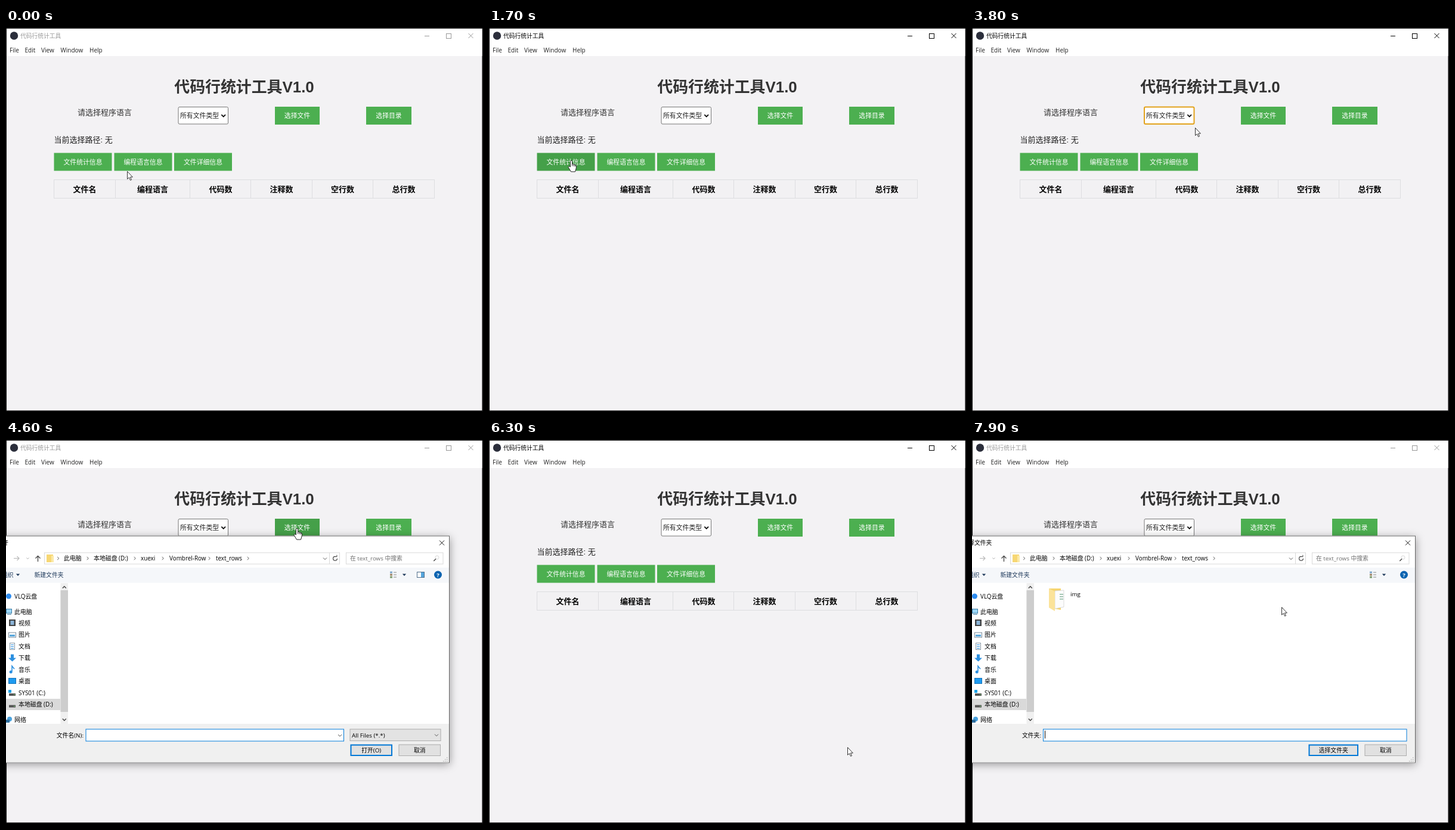
Animation of 800 by 644 pixels, one loop 8000 ms. Source, as an HTML page with a canvas:

```html
<!DOCTYPE html>
<html lang="zh-CN">
<head>
<meta charset="utf-8">
<style>
html, body { margin: 0; height: 100%; overflow: hidden; background: #000; }
canvas { display: block; }
</style>
</head>
<body>
<canvas id="stage" width="800" height="644"></canvas>
<script>
const c = document.getElementById('stage').getContext('2d');
const UI = '"Open Sans", "Noto Sans CJK SC", sans-serif';
const PAGE = '"Liberation Sans", "Noto Sans CJK SC", sans-serif';
const LOOP = 8000, STEP = 100;

// Pointer track: time, x, y
const track = [
  [0, 203, 240], [200, 225, 230], [400, 330, 226], [900, 675, 264], [1100, 675, 264],
  [1500, 146, 225], [1600, 146, 225], [1700, 138, 222], [2000, 290, 152], [2200, 346, 150],
  [2300, 346, 152], [2400, 342, 190], [2500, 350, 227], [2600, 356, 253], [2700, 356, 253],
  [2900, 358, 174], [3200, 358, 174], [3400, 371, 168], [3700, 371, 168], [3800, 374, 167],
  [4100, 488, 148], [4900, 488, 148], [5300, 419, 264], [5500, 419, 264], [5800, 597, 487],
  [5900, 605, 515], [6200, 605, 515], [6300, 601, 515], [6700, 640, 149], [7700, 640, 149],
  [7900, 519, 280]
];

const languages = ['所有文件类型', 'JavaScript', 'Python', 'Java', 'XML', 'HTML', 'Lua', 'C#',
  'PHP', 'CSS', 'Vue', 'TypeScript', 'Go', 'Rust'];
const buttons = [
  ['选择文件', 451, 132, 75], ['选择目录', 604, 132, 76],
  ['文件统计信息', 80.5, 209.5, 97], ['编程语言信息', 181.5, 209.5, 97], ['文件详细信息', 282, 209.5, 97]
];
const headers = [['文件名', 132], ['编程语言', 246], ['代码数', 360], ['注释数', 462], ['空行数', 564.5], ['总行数', 667]];
const crumbs = [['此电脑', 97, 137], ['本地磁盘 (D:)', 147, 216], ['xuexi', 226, 263],
  ['Vombrel-Row', 274, 341], ['text_rows', 352, 406]];
const files = [['blackList', '1.26 KB', 331, 253], ['commentPatterns', '1.66 KB', 537, 253],
  ['fileCounter', '5.14 KB', 125, 303], ['readDirectory', '23.8 KB', 331, 303], ['README', '4.92 KB', 537, 303]];
const places = [['VLQ云盘', 14, 262], ['此电脑', 14, 288], ['视频', 21, 307], ['图片', 21, 326.5],
  ['文档', 21, 346], ['下载', 21, 365.5], ['音乐', 21, 385], ['桌面', 21, 404],
  ['SYS01 (C:)', 21, 424], ['本地磁盘 (D:)', 21, 443.5], ['网络', 14, 469]];

function text(s, x, cy, size = 9.8, color = '#000', align = 'left', font = UI, weight = '') {
  c.font = `${weight} ${size}px ${font}`;
  c.fillStyle = color;
  c.textAlign = align;
  c.fillText(s, x, cy + size * 0.37);
}
function box(x, y, w, h, fill, stroke, width = 1) {
  if (fill) { c.fillStyle = fill; c.fillRect(x, y, w, h); }
  if (stroke) {
    c.strokeStyle = stroke;
    c.lineWidth = width;
    c.strokeRect(x + width / 2, y + width / 2, w - width, h - width);
  }
}
function path(points, color, width = 1, fill) {
  c.beginPath();
  for (let i = 0; i < points.length; i += 2) c.lineTo(points[i], points[i + 1]);
  if (fill) { c.closePath(); c.fillStyle = fill; c.fill(); }
  if (color) { c.strokeStyle = color; c.lineWidth = width; c.stroke(); }
}
function disc(x, y, r, fill) {
  c.beginPath();
  c.arc(x, y, r, 0, 7);
  c.fillStyle = fill;
  c.fill();
}
const chevron = (x, y, color = '#555', r = 3, width = 1) => path([x - r, y - r / 2, x, y + r / 2, x + r, y - r / 2], color, width);
const right = (x, y) => path([x - 1.3, y - 2.5, x + 1.3, y, x - 1.3, y + 2.5], '#555', 1);
const caret = (x, y) => path([x - 3.2, y - 1.6, x + 3.2, y - 1.6, x, y + 2], null, 0, '#1e395b');
const cross = (x, y, color) => {
  path([x - 4, y - 4, x + 4, y + 4], color);
  path([x - 4, y + 4, x + 4, y - 4], color);
};
function shadowed(blur, draw) {
  c.save();
  c.shadowColor = 'rgba(0,0,0,.4)';
  c.shadowBlur = blur;
  c.shadowOffsetY = blur / 5;
  draw();
  c.restore();
}

function pointer(t) {
  let i = 1;
  while (i < track.length - 1 && track[i][0] < t) i++;
  const [a, x, y] = track[i - 1], [b, u, v] = track[i];
  const k = Math.min(1, (t - a) / (b - a));
  return [x + (u - x) * k, y + (v - y) * k];
}
function drawPointer(x, y, hand) {
  c.save();
  c.translate(x, y);
  c.lineJoin = 'round';
  if (hand) {
    c.beginPath();
    c.moveTo(-1.6, 11);
    c.lineTo(-1.6, 1.5);
    c.quadraticCurveTo(0, -1.5, 1.6, 1.5);
    c.lineTo(1.6, 6);
    c.quadraticCurveTo(3.3, 5, 4.2, 7);
    c.quadraticCurveTo(5.8, 6, 6.6, 8);
    c.quadraticCurveTo(8.6, 7.5, 8.6, 10);
    c.lineTo(8, 14);
    c.lineTo(6.5, 19);
    c.lineTo(-0.5, 19);
    c.lineTo(-5, 11.5);
    c.quadraticCurveTo(-4.5, 8.5, -1.6, 11);
    c.fillStyle = '#fff';
    c.fill();
    c.strokeStyle = '#222';
    c.lineWidth = 1;
    c.stroke();
    path([1.6, 6, 1.6, 9.5], '#222');
    path([4.2, 7, 4.2, 10], '#222');
    path([6.6, 8, 6.6, 10.5], '#222');
  } else {
    path([0.5, 0.5, 0.5, 13.3, 3.4, 10.7, 5.6, 15.4, 7.5, 14.5, 5.4, 10, 9.4, 10, 0.5, 0.5], '#333', 1, '#fff');
  }
  c.restore();
}

function drawWindow(active, ring, hover) {
  box(0, 0, 800, 644, '#080808');
  box(1, 1, 797.5, 640.5, '#f3f2f4');
  box(1, 1, 797.5, 46, '#fff');
  const ink = active ? '#000' : '#999';
  disc(13.5, 13, 6.7, '#2b2e3b');
  text('代码行统计工具', 24, 13.5, 9.75, ink);
  path([702, 13.5, 710, 13.5], ink);
  box(738, 9, 9, 9, null, ink);
  cross(779.5, 13, ink);
  [['File', 6], ['Edit', 31.5], ['View', 59], ['Window', 91.5], ['Help', 140]]
    .forEach(([s, x]) => text(s, x, 37, 10, '#222'));

  text('代码行统计工具V1.0', 399.5, 98.5, 25.9, '#333', 'center', PAGE, 'bold');
  text('请选择程序语言', 120, 141, 13, '#333', 'left', PAGE);
  text('当前选择路径: 无', 80.5, 187, 13, '#222', 'left', PAGE);

  c.beginPath();
  c.roundRect(289, 132.5, 83.5, 28.5, 2);
  c.fillStyle = '#fff';
  c.fill();
  c.strokeStyle = ring ? '#e2a21a' : '#767676';
  c.lineWidth = ring ? 2 : 1;
  c.stroke();
  text('所有文件类型', 292, 146.5, 10.85, '#222', 'left', PAGE);
  chevron(364.7, 147, '#111', 3.4, 1.8);

  buttons.forEach(([s, x, y, w]) => {
    box(x, y, w, 30, s === hover ? '#45a049' : '#4caf50');
    text(s, x + w / 2, y + 15, 10.85, '#fff', 'center', PAGE);
  });

  box(80, 254, 639, 32, '#f2f1f3', '#dddde0');
  [183.5, 308.5, 410.5, 513.5, 615.5].forEach(x => path([x, 254, x, 286], '#dddde0'));
  headers.forEach(([s, x]) => text(s, x, 270, 13, '#000', 'center', PAGE, 'bold'));
}

function drawList(row) {
  shadowed(9, () => box(288.5, 161.5, 84, 274.5, '#fff'));
  box(288.5, 161.5, 84, 274.5, null, '#777');
  languages.forEach((s, i) => {
    const y = 173 + i * 19.45;
    if (i === row) box(289, y - 10, 83, 19.5, '#1967d2');
    text(s, 293, y, 10.8, i === row ? '#fff' : '#222', 'left', PAGE);
  });
}

function folderIcon(x, y) {
  path([x, y, x + 20, y, x + 20, y + 36, x, y + 32], null, 0, '#f6d570');
  path([x + 10, y + 4, x + 25, y + 3, x + 25, y + 31, x + 10, y + 34], '#ccc', 0.7, '#fcfcfc');
  [9, 13, 17].forEach(d => box(x + 18, y + d, 6, 1.5, '#8bb7a0'));
  path([x, y, x + 10, y + 5, x + 10, y + 38, x, y + 32], null, 0, '#fbe39a');
}
function scriptIcon(x, y) {
  path([x + 1, y, x + 26, y, x + 33, y + 7, x + 33, y + 39, x + 1, y + 39, x + 1, y], '#111', 1.3, '#fff');
  path([x + 26, y, x + 26, y + 7, x + 33, y + 7], '#111', 1);
  path([x + 9, y + 7, x + 25, y + 7, x + 23, y + 13, x + 19, y + 15, x + 27, y + 22, x + 27, y + 27,
    x + 23, y + 33, x + 6, y + 33, x + 7, y + 28, x + 16, y + 27, x + 8, y + 18, x + 6, y + 11, x + 9, y + 7], '#111', 1.4, '#e9e47c');
  path([x + 12, y + 11, x + 21, y + 11], '#333');
  path([x + 13, y + 16, x + 20, y + 17], '#333');
  path([x + 16, y + 22, x + 24, y + 23], '#333');
  path([x + 12, y + 30, x + 22, y + 30], '#333');
}
function placeIcon(i, y) {
  const blue = '#2b8fe0';
  if (i === 0) disc(4.5, y, 4.5, '#2d8cf0');
  else if (i === 1) { box(0, y - 5, 10, 8, '#9bd7f7', '#3a7ca5'); box(2, y + 4, 7, 1, '#3a7ca5'); }
  else if (i === 2) { box(5, y - 6, 11, 11, '#444'); box(7.5, y - 4, 6, 7, '#8ab4d8'); }
  else if (i === 3) { box(4, y - 4, 13, 9, '#fff', '#7a8a99'); box(6, y, 9, 3, '#4a9fd8'); }
  else if (i === 4) { box(6, y - 6, 9, 12, '#fff', '#8797a5'); [-3, 0, 3].forEach(d => box(8, y + d, 5, 1, blue)); }
  else if (i === 5) path([8, y - 6, 13, y - 6, 13, y, 17, y, 10.5, y + 6, 4, y, 8, y], null, 0, blue);
  else if (i === 6) { path([10, y + 3, 10, y - 6, 14, y - 1], blue, 1.6); disc(8.2, y + 4, 2.5, blue); }
  else if (i === 7) box(4, y - 5, 13, 10, '#1e9bf0', '#1672b8');
  else if (i < 10) { box(5, y + 1, 11, 4, '#555'); box(13, y + 2.5, 2, 1, '#7d7'); if (i === 8) box(4, y - 5, 5, 5, '#20a4e8'); }
  else { disc(6, y - 1, 4, '#4aa3df'); box(0, y, 6, 5, '#2f6f9f'); }
}

function drawSidebar() {
  box(0, 434, 91, 19, '#d9d9d9');
  places.forEach(([s, x, y], i) => {
    placeIcon(i, y);
    text(s, x, y, 9.9);
  });
  box(91.5, 240, 12.5, 236, '#f0f0f0');
  box(91.5, 252, 12.5, 204, '#cdcdcd');
  path([94.8, 248.5, 97.8, 245.5, 100.8, 248.5], '#444', 1.4);
  chevron(97.8, 469, '#444', 3, 1.4);
}

function dialogButton(s, x, w, main, hot) {
  box(x, 510.5, w, 19.5, hot ? '#e5f1fb' : '#e1e1e1', main ? '#0078d7' : '#adadad', main ? 2 : 1);
  text(s, x + w / 2, 520, 9.8, '#000', 'center');
}

function drawDialog(d) {
  shadowed(14, () => box(-20, 161, 763.5, 380, '#fff'));
  box(-20, 160.5, 764, 381, '#fff', '#666');
  text(d.folder ? '选择文件夹' : '打开', -15.5, 172.5, 9.75);
  cross(731, 172.5, '#111');

  path([13, 198.5, 22, 198.5], '#bbb', 1.2);
  path([18.5, 195, 22, 198.5, 18.5, 202], '#bbb', 1.2);
  chevron(36.5, 198.5, '#aaa', 2);
  path([53.5, 204, 53.5, 194.5], '#444', 1.3);
  path([49.5, 198.5, 53.5, 194.5, 57.5, 198.5], '#444', 1.3);
  box(64, 188.5, 496, 20, '#fff', '#d9d9d9');
  path([542.5, 189, 542.5, 208], '#d9d9d9');
  box(68, 192, 11, 13, '#f7d774');
  box(76, 194, 4, 11, '#fbe9a8');
  right(87.5, 198.5);
  crumbs.forEach(([s, x, next]) => { text(s, x, 198, 9.9); right(next, 198.5); });
  chevron(535, 199, '#555', 3);
  c.beginPath();
  c.arc(552, 198.7, 3.4, 0, 5.2);
  c.strokeStyle = '#444';
  c.lineWidth = 1.2;
  c.stroke();
  path([551.5, 195.5, 555, 195.7, 554.8, 192.8], '#444');
  box(570, 188.5, 163.5, 20, '#fff', '#d9d9d9');
  text('在 text_rows 中搜索', 577, 198.5, 9.8, '#6d6d6d');
  c.beginPath();
  c.arc(723, 197, 3, 0, 7);
  c.stroke();
  path([721, 199.3, 717.3, 203], '#444', 1.4);

  box(0, 214, 743, 25.5, '#f5f7fa');
  text('组织', -7, 226, 9.8, '#1e395b');
  caret(20, 226);
  text('新建文件夹', 47.5, 226, 9.8, '#1e395b');
  const vx = d.folder ? 667 : 644;
  [0, 4, 8].forEach(k => {
    box(vx, 220.5 + k, 4, 3, ['#7fa8cc', '#a08468', '#7f9d70'][k / 4]);
    box(vx + 6, 221.5 + k, 5, 1, '#888');
  });
  caret(vx + 24, 226);
  if (!d.folder) { box(689, 221, 13, 10, '#fff', '#52708c'); box(696, 222, 5, 8, '#55a5dc'); }
  disc(724.5, 226, 6.5, '#0a63b0');
  text('?', 724.5, 226, 9.5, '#fff', 'center', UI, 'bold');

  if (d.sidebar) drawSidebar();
  if (d.content) {
    if (d.state) box(325, 244, 203, 47.5, d.state === 2 ? '#cce8ff' : '#e5f3ff', d.state === 2 ? '#99d1ff' : null);
    folderIcon(129, 249);
    text('img', 165, d.folder ? 258 : 260.5);
    if (!d.folder) files.forEach(([name, size, x, y]) => {
      const doc = name === 'README';
      if (doc) {
        box(x + 3.5, y - 2, 27, 34, '#f4f6f7', '#c5cbd0');
        box(x + 9, y + 7, 16, 16, '#3c8dbc');
      } else scriptIcon(x, y - 5);
      text(name, x + 40, y);
      text(doc ? 'Markdown 源文件' : 'JavaScript 文件', x + 40, y + 14.5, 9.8, '#6d6d6d');
      text(size, x + 40, y + 29, 9.8, '#6d6d6d');
    });
  }

  box(0, 476, 743, 64.5, '#f0f0f0');
  if (d.folder) {
    text('文件夹:', 116, 495, 9.8, '#000', 'right');
    box(119, 484.5, 610.5, 21, '#fff', '#0078d7');
    box(122, 487.5, 1, 13, '#000');
    dialogButton('选择文件夹', 564.5, 83.5, true);
  } else {
    text('文件名(N):', 130, 495, 9.8, '#000', 'right');
    box(133.5, 484.5, 433.5, 21, '#fff', '#0078d7');
    if (d.state === 2) text('blackList', 137, 495);
    chevron(560, 495.5);
    box(576.5, 484.5, 153, 20.5, '#e3e3e3', '#adadad');
    text('All Files (*.*)', 580, 495);
    chevron(722, 495);
    dialogButton('打开(O)', 577.5, 70.5, true, d.hot);
  }
  dialogButton('取消', 658.5, 70.5);
  for (let i = 0; i < 3; i++)
    for (let j = 0; j <= i; j++) box(739 - j * 3, 532 + i * 3, 1.3, 1.3, '#aaa');
}

function draw(t) {
  const within = (a, b) => t >= a && t < b;
  const [x, y] = pointer(t);
  const list = within(2300, 2900);
  const over = !list && buttons.find(([, bx, by, w]) => x >= bx && x <= bx + w && y >= by && y <= by + 30);
  const active = within(300, 4300) || within(6100, 7100);
  drawWindow(active, within(2900, 4200), over && over[0]);
  if (list) drawList(t < 2500 ? 0 : t < 2600 ? 3 : t < 2800 ? 4 : 0);
  if (within(4500, 6100)) drawDialog({
    sidebar: t >= 4600, content: t >= 4700,
    state: t >= 5400 ? 2 : t >= 5300 ? 1 : 0,
    hot: y > 510
  });
  if (t >= 7300) drawDialog({ folder: true, content: t >= 7500, sidebar: t >= 7800 });
  drawPointer(x, y, over);
}

function frame(now) {
  draw(Math.floor(now % LOOP / STEP) * STEP);
  requestAnimationFrame(frame);
}
draw(0);
requestAnimationFrame(frame);
</script>
</body>
</html>
```
